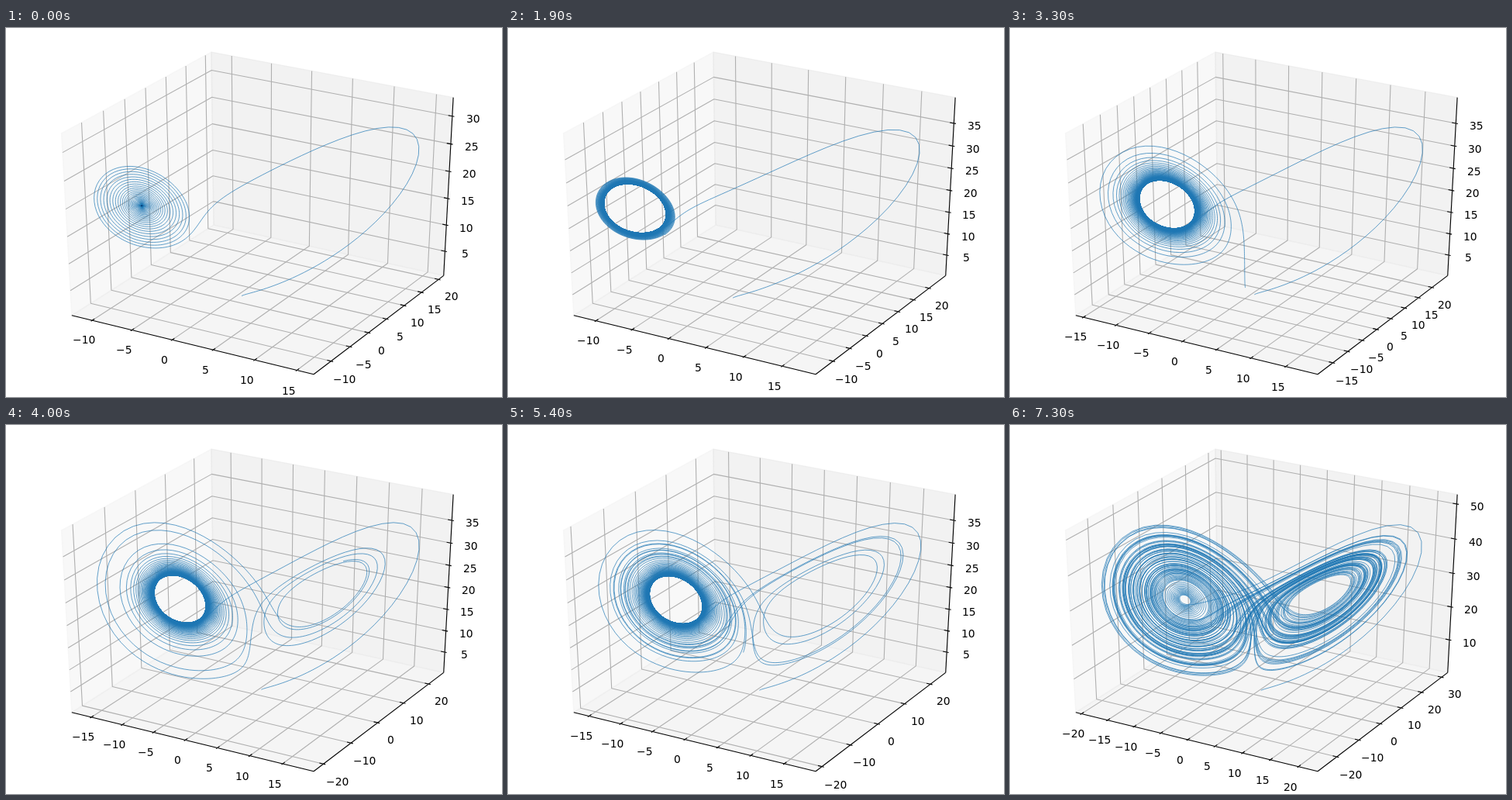
Recreate the animation shown at these times as an HTML page with a canvas. Size 640x476 px, loop 7.4 s.

```html
<!DOCTYPE html>
<html lang="en">
<head>
<meta charset="utf-8">
<title>Lorenz attractor</title>
<style>
  html, body { margin: 0; width: 100%; height: 100%; overflow: hidden; background: #fff; }
  canvas { display: block; }
</style>
</head>
<body>
<canvas id="stage" width="640" height="476"></canvas>
<script>
const W = 640, H = 476;
const FRAMES = 74, FRAME_MS = 100;
const DT = 0.01, STEPS = 10000;
const SIGMA = 10, BETA = 2.667;
const EDGE = 0.5 + 1 / 48;        // panes reach a little past the data limits
const LABEL = EDGE + 0.0572;
const PT = 100 / 72;
const ctx = document.getElementById('stage').getContext('2d');

// One fourth-order Runge-Kutta step, in place.
function advance(p, r) {
  const [x, y, z] = p;
  let kx = 0, ky = 0, kz = 0, sx = 0, sy = 0, sz = 0;
  for (let i = 0; i < 4; i++) {
    const h = i === 0 ? 0 : i === 3 ? DT : DT / 2;
    const a = x + h * kx, b = y + h * ky, c = z + h * kz;
    kx = SIGMA * (b - a);
    ky = a * (r - c) - b;
    kz = a * b - BETA * c;
    const weight = i === 0 || i === 3 ? 1 : 2;
    sx += weight * kx;
    sy += weight * ky;
    sz += weight * kz;
  }
  p[0] = x + sx * DT / 6;
  p[1] = y + sy * DT / 6;
  p[2] = z + sz * DT / 6;
}

// Does the orbit leave the left wing again before the given time?
function escapes(r, time) {
  const p = [1, 1, 1];
  for (let t = 0; t < time; t += DT) {
    advance(p, r);
    if (t > 3 && p[0] > 0) return true;
  }
  return false;
}

function smallestEscaping(time) {
  let low = 23, high = 25;
  for (let i = 0; i < 26; i++) {
    const mid = (low + high) / 2;
    if (escapes(mid, time)) high = mid; else low = mid;
  }
  return high;
}

// r rises fast to the onset of chaos, creeps across it, then runs on to 30.
const onset = smallestEscaping(300);
const fullRun = smallestEscaping(100.2);
const creep = k => onset + (fullRun - onset) * (k - 7.5) / 25.5;
const lerp = (a, b, t) => a + (b - a) * t;

function rAt(k) {
  if (k < 10) return lerp(20, creep(10), k / 10);
  if (k <= 64) return creep(k);
  return lerp(creep(64), 30, (k - 64) / 9);
}

function orbit(r) {
  const p = [1, 1, 1], points = [[1, 1, 1]];
  for (let i = 0; i < STEPS; i++) {
    advance(p, r);
    points.push([p[0], p[1], p[2]]);
  }
  return points;
}

function limits(points, axis) {
  let low = Infinity, high = -Infinity;
  for (const p of points) {
    low = Math.min(low, p[axis]);
    high = Math.max(high, p[axis]);
  }
  const pad = axis < 2 ? 0.05 * (high - low) : 0;
  return [low - pad, high + pad];
}

function ticks([low, high]) {
  const raw = (high - low) / 9;
  const power = 10 ** Math.floor(Math.log10(raw));
  const step = power * [1, 2, 2.5, 5, 10].find(s => s * power >= raw);
  const list = [];
  for (let i = Math.ceil(low / step); i * step <= high; i++) list.push(i * step);
  return list;
}

// Perspective view of the centred unit cube: azimuth -60, elevation 30, distance 10.
const S = Math.sqrt(3);
function project([x, y, z]) {
  const depth = 10 - (S / 4 * x - 0.75 * y + 0.5 * z);
  const u = (S / 2 * x + 0.5 * y) / depth;
  const v = (-0.25 * x + S / 4 * y + S / 2 * z) / depth;
  return [W * (u + 0.095) / 0.185, H * (0.09 - v) / 0.185];
}

function trace(points) {
  ctx.beginPath();
  for (const p of points) ctx.lineTo(...project(p));
}

function line(points, color, width) {
  trace(points);
  ctx.strokeStyle = color;
  ctx.lineWidth = width * PT;
  ctx.stroke();
}

// Short strokes let the coverage of neighbouring turns add up to a solid tone.
function curve(points, color, width) {
  const part = 40;
  for (let i = 0; i < points.length - 1; i += part) {
    line(points.slice(i, i + part + 1), color, width);
  }
}

function pane(points, shade) {
  trace(points);
  ctx.closePath();
  ctx.fillStyle = shade;
  ctx.fill();
  ctx.strokeStyle = shade;
  ctx.lineWidth = PT;
  ctx.stroke();
}

const A = -EDGE, B = EDGE;
const OUT = EDGE + 1 / 120, IN = EDGE - 1 / 60;
const AXES = [
  {
    grid: t => [[t, A, A], [t, B, A], [t, B, B]],
    edge: t => [t, A, A],
    tick: t => [[t, -OUT, A], [t, -IN, A]],
    label: t => [t, -LABEL, -LABEL]
  },
  {
    grid: t => [[B, t, A], [A, t, A], [A, t, B]],
    edge: t => [B, t, A],
    tick: t => [[OUT, t, A], [IN, t, A]],
    label: t => [LABEL, t, -LABEL]
  },
  {
    grid: t => [[B, B, t], [A, B, t], [A, A, t]],
    edge: t => [B, B, t],
    tick: t => [[OUT, B, t], [IN, B, t]],
    label: t => [LABEL, LABEL, t]
  }
];

function drawAxis(axis, range) {
  const unit = value => (value - range[0]) / (range[1] - range[0]) - 0.5;
  const values = ticks(range);
  line([axis.edge(A), axis.edge(B)], '#000', 0.8);
  for (const value of values) line(axis.grid(unit(value)), '#b0b0b0', 0.8);
  ctx.fillStyle = '#000';
  for (const value of values) {
    const t = unit(value);
    line(axis.tick(t), '#000', 0.8);
    const [x, y] = project(axis.label(t));
    const text = String(value).replace('-', '\u2212');
    const left = Math.round(x - ctx.measureText(text).width / 2);
    ctx.fillText(text, left, Math.round(y + 11));
  }
}

function draw(k) {
  const points = orbit(rAt(k));
  const ranges = [0, 1, 2].map(axis => limits(points, axis));
  ctx.fillStyle = '#fff';
  ctx.fillRect(0, 0, W, H);
  ctx.font = 10 * PT + 'px "DejaVu Sans", sans-serif';
  ctx.lineJoin = 'round';
  pane([[A, A, A], [A, B, A], [A, B, B], [A, A, B]], 'rgba(242,242,242,.5)');
  pane([[A, B, A], [B, B, A], [B, B, B], [A, B, B]], 'rgba(230,230,230,.5)');
  pane([[A, A, A], [B, A, A], [B, B, A], [A, B, A]], 'rgba(236,236,236,.5)');
  AXES.forEach((axis, i) => drawAxis(axis, ranges[i]));
  const scaled = points.map(p =>
    p.map((value, i) => (value - ranges[i][0]) / (ranges[i][1] - ranges[i][0]) - 0.5));
  curve(scaled, '#1f77b4', 0.5);
}

let start = null, shown = 0;
function play(now) {
  if (start === null) start = now;
  const k = Math.floor(Math.max(0, now - start) / FRAME_MS) % FRAMES;
  if (k !== shown) draw(shown = k);
  requestAnimationFrame(play);
}
draw(0);
requestAnimationFrame(play);
</script>
</body>
</html>
```
